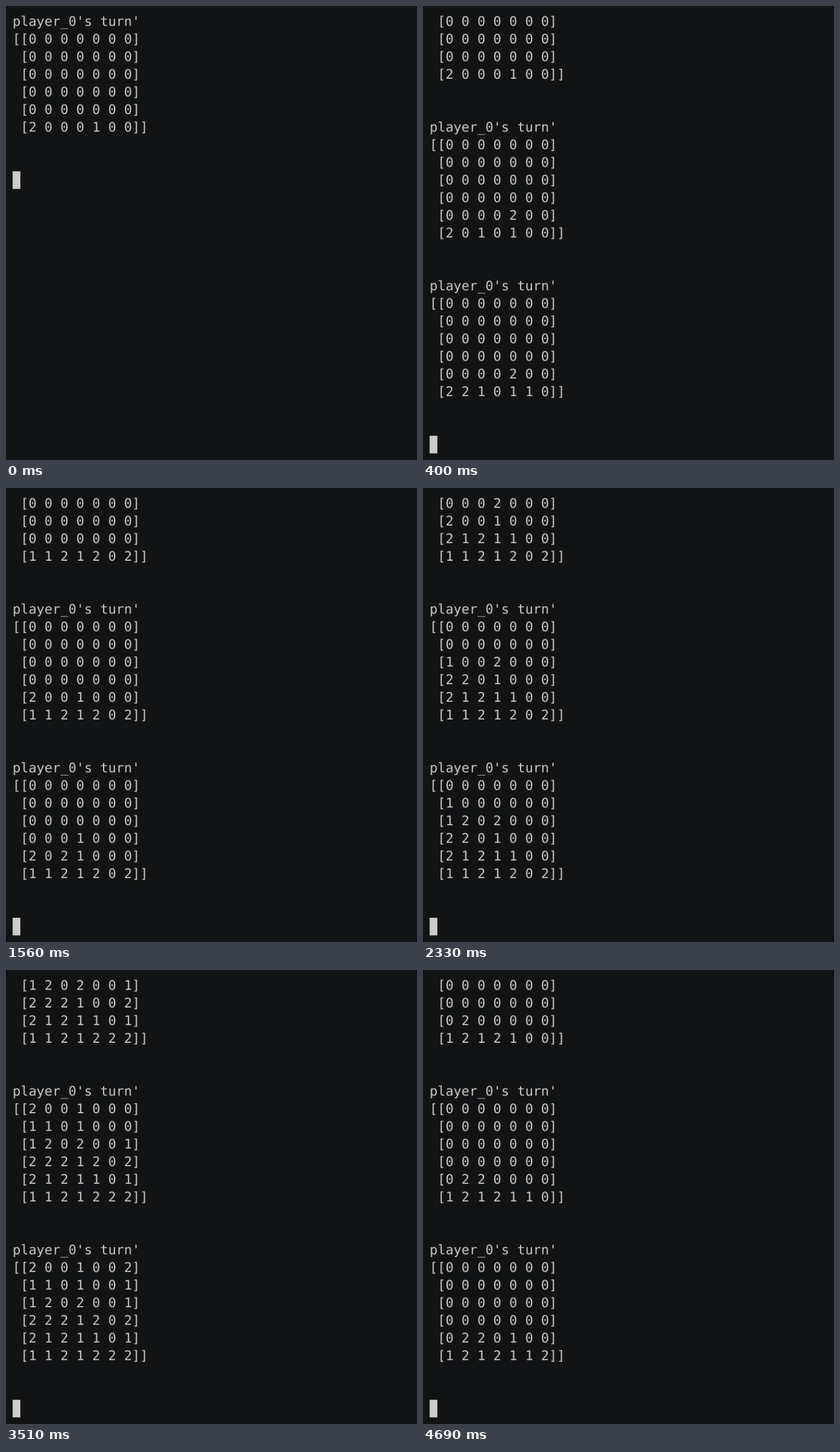
An HTML page with a canvas for the animation above (5.69 s loop, 712 by 786 pixels).

```html
<!DOCTYPE html>
<html lang="en">
<head>
<meta charset="utf-8">
<title>Four in a row</title>
<style>
  html, body { margin: 0; width: 100%; height: 100%; overflow: hidden; background: #121314; }
  canvas { display: block; width: 100%; height: 100%; }
</style>
</head>
<body>
<canvas id="terminal" width="746" height="824"></canvas>
<script>
const LOOP = 5690, STEP = 195, LEAD = 10;
const ROWS = 6, COLS = 7, VISIBLE = 24;
const PAD = 12, LINE = 32, BASELINE = 24;

// Every turn names the column of piece 1, then that of piece 2.
const games = [
  "40 24 51",
  "34 12 06 30 32 40 13 01 01 30 66 65 32 14 66",
  "03 21 41 52 46"
];

function drop(board, col, piece) {
  let row = ROWS - 1;
  while (board[row][col]) row--;
  board[row][col] = piece;
}

const boardLines = board => board.map((row, i) =>
  (i ? " [" : "[[") + row.join(" ") + (i === ROWS - 1 ? "]]" : "]"));

const log = [], screens = [];

function print(board) {
  log.push("player_0's turn'", ...boardLines(board), "", "");
  screens.push(log.slice(-VISIBLE));
}

games.forEach((game, n) => {
  const board = Array.from({ length: ROWS }, () => Array(COLS).fill(0));
  if (n) print(board);
  for (const turn of game.split(" ")) {
    [...turn].forEach((col, i) => drop(board, +col, i + 1));
    print(board);
  }
});

const canvas = document.getElementById("terminal");
const ctx = canvas.getContext("2d");
ctx.font = '24px "DejaVu Sans Mono", monospace';
ctx.textRendering = "geometricPrecision";

function draw() {
  const t = performance.now() % LOOP;
  const step = Math.min(Math.floor((t + LEAD) / STEP), screens.length - 1);
  const lines = screens[step];
  ctx.fillStyle = "#121314";
  ctx.fillRect(0, 0, canvas.width, canvas.height);
  ctx.fillStyle = "#ccc";
  lines.forEach((line, i) => ctx.fillText(line, PAD, PAD + BASELINE + i * LINE));
  ctx.fillRect(PAD, PAD + lines.length * LINE, 14, LINE);
  requestAnimationFrame(draw);
}
draw();
</script>
</body>
</html>
```
